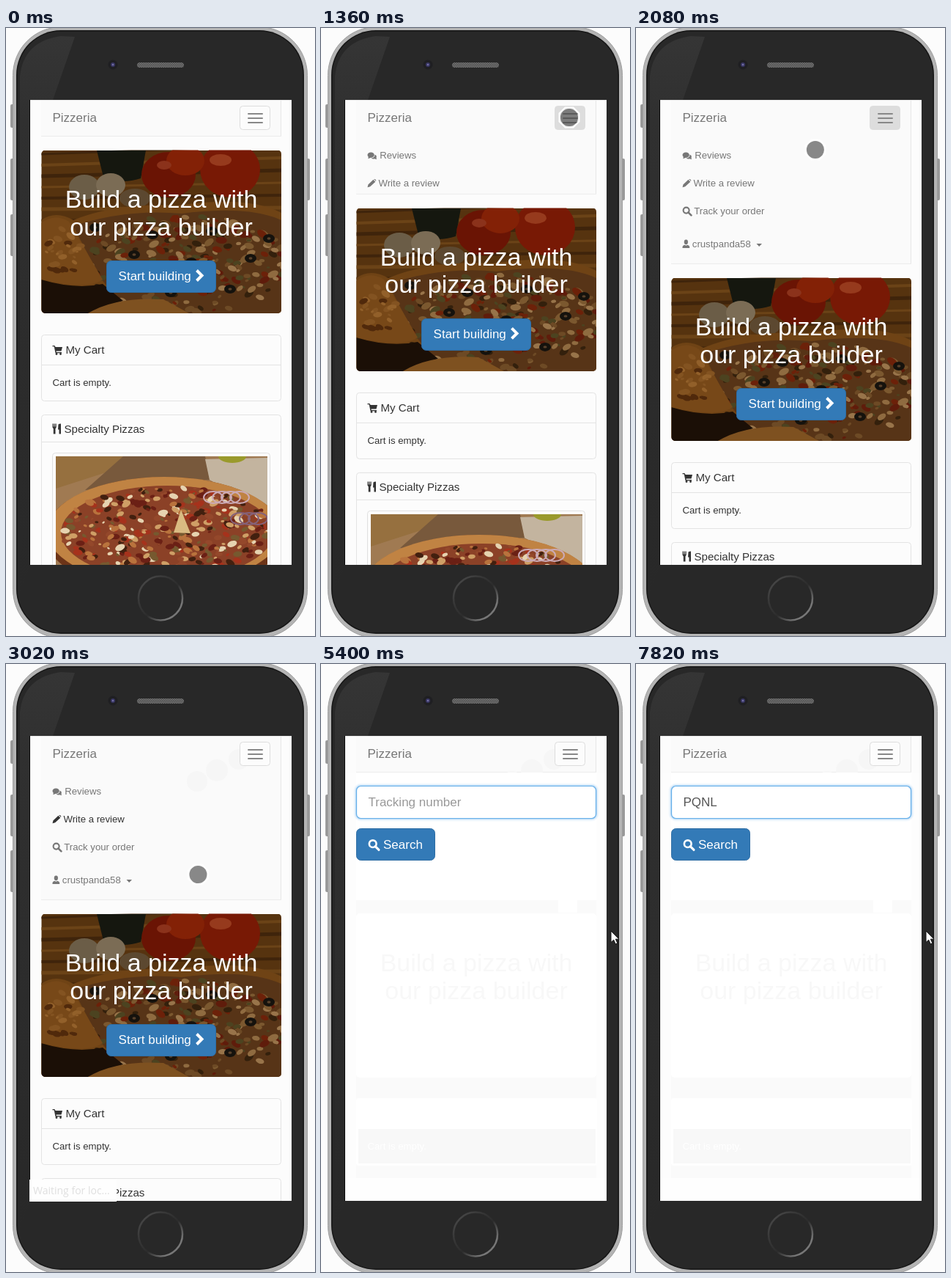
An HTML page that plays this animation: 422 px wide and 829 px high, repeating every 8000 ms.

```html
<!DOCTYPE html>
<html lang="en">
<head>
<meta charset="utf-8">
<title>Pizza order tracking</title>
<style>
html, body { margin: 0; width: 100%; height: 100%; overflow: hidden; background: #fcfcfc; }
svg { display: block; width: 422px; height: 829px; font-family: "Liberation Sans", Arial, sans-serif; }
.status { font-family: "Open Sans", "Noto Sans", sans-serif; }
</style>
</head>
<body>
<svg id="stage" viewBox="0 0 422 829" xmlns="http://www.w3.org/2000/svg"></svg>
<script>
const LOOP = 8000, MENU_H = 174;

// ---------- helpers ----------
let seed = 7;
const rnd = () => (seed = (seed * 16807) % 2147483647) / 2147483647;
const clamp = v => Math.max(0, Math.min(1, v));
const ramp = (t, a, b) => clamp((t - a) / (b - a));
const lerp = (a, b, k) => a + (b - a) * k;
const smooth = k => k * k * (3 - 2 * k);

// CSS "ease" timing curve, cubic-bezier(.25, .1, .25, 1)
function ease(x) {
  let lo = 0, hi = 1, u = x;
  for (let i = 0; i < 20; i++) {
    u = (lo + hi) / 2;
    const px = .75 * u * (1 - u) * (1 - u) + .75 * u * u * (1 - u) + u ** 3;
    if (px < x) lo = u; else hi = u;
  }
  return .3 * u * (1 - u) * (1 - u) + 3 * u * u * (1 - u) + u ** 3;
}

const rect = (x, y, w, h, fill, r = 0, extra = '') =>
  `<rect x="${x}" y="${y}" width="${w}" height="${h}" rx="${r}" fill="${fill}" ${extra}/>`;
const oval = (x, y, rx, ry, fill, extra = '') =>
  `<ellipse cx="${x}" cy="${y}" rx="${rx}" ry="${ry}" fill="${fill}" ${extra}/>`;
const path = (d, fill, extra = '') => `<path d="${d}" fill="${fill}" ${extra}/>`;
const text = (x, y, size, fill, str, extra = '') =>
  `<text x="${x}" y="${y}" font-size="${size}" fill="${fill}" ${extra}>${str}</text>`;
const at = (x, y, s, body) => `<g transform="translate(${x} ${y}) scale(${s})">${body}</g>`;

// Random bits of topping inside an ellipse
function scatter(n, cx, cy, rx, ry, size, colors) {
  let out = '';
  for (let i = 0; i < n; i++) {
    const a = rnd() * 6.283, d = Math.sqrt(rnd()), s = size * (.4 + rnd());
    const x = (cx + rx * d * Math.cos(a)).toFixed(1), y = (cy + ry * d * Math.sin(a)).toFixed(1);
    out += oval(x, y, s.toFixed(1), (s * .6).toFixed(1), colors[i % colors.length],
      `transform="rotate(${(rnd() * 80 - 40).toFixed(0)} ${x} ${y})"`);
  }
  return out;
}

// ---------- icons, drawn in a 14 unit box ----------
const stroke = (c, w) => `stroke="${c}" stroke-width="${w}"`;
const icon = {
  cart: c => path('M0 1H3L4 3H13.5L12 8.5H5L5.3 10H12.5V11.3H4L2.2 2.3H0Z', c) + oval(5.5, 12.5, 1.4, 1.4, c) + oval(11, 12.5, 1.4, 1.4, c),
  cutlery: c => path('M0 0H1.2V4H2V0H3.2V4H4V0H5.2V5L4 7V14H1.3V7L0 5ZM8 1Q9 0 11.5 0V14H9V8H7.5Z', c),
  talk: c => oval(5, 5.5, 5, 4, c) + path('M1.5 7L1 11L6 9Z', c) + path('M10.8 5Q14 6 13 9.2L13.2 12L10.5 11Q7 11.7 5.5 10.2Q11 9.5 10.8 5Z', c),
  pencil: c => path('M0 13L1 9L8.8 1.5L12 4.6L4 12ZM9.7 .8Q10.7 0 11.7 .9L12.7 1.9Q13.5 2.8 12.7 3.7Z', c),
  search: c => oval(5.5, 5.5, 4.3, 4.3, 'none', stroke(c, 2.3)) + path('M8.5 8.5L12.8 12.8', 'none', stroke(c, 2.8) + ' stroke-linecap="round"'),
  user: c => oval(5.5, 3.8, 3, 3.8, c) + path('M0 13V11Q0 9.5 3.5 8.3L5.5 9.5L7.5 8.3Q11 9.5 11 11V13Z', c),
};

// ---------- pictures ----------
function banner() {
  let s = rect(48, 167, 328, 222, '#56330f');
  for (let i = 0; i < 7; i++) s += path(`M48 ${172 + i * 15}L376 ${160 + i * 17}`, 'none', stroke(i % 2 ? '#6b4317' : '#3f240b', 3 + i % 3));
  s += path('M124 167H191L184 205Q156 214 133 203Z', '#15170f');
  s += oval(222, 200, 37, 31, '#6a1404') + oval(306, 193, 41, 38, '#781905') + oval(245, 181, 26, 20, '#832106');
  s += oval(293, 180, 15, 8, '#963a1d') + oval(216, 187, 10, 6, '#8b321b');
  s += oval(107, 217, 21, 17, '#6b5d47') + oval(143, 214, 20, 16, '#7b6c55') + oval(176, 232, 21, 13, '#5c4830');
  s += path('M48 262Q68 248 92 262Q150 238 235 242Q330 228 376 252V389H48Z', '#6f4315');
  s += path('M92 270Q165 246 240 253Q330 241 376 262V389H170L128 340Z', '#573417');
  s += scatter(260, 250, 322, 145, 66, 5.5, ['#7b582f', '#5f1c0b', '#8f6b40', '#33200c', '#6c2109', '#4c4320', '#98744a', '#6d4a25']);
  for (let i = 0; i < 12; i++) {
    const x = 122 + i * 53 % 240, y = 272 + i * 37 % 106;
    s += oval(x, y, 8, 6, '#15120d') + oval(x, y, 2.5, 1.7, '#58402a');
  }
  s += path('M48 266Q66 252 86 264L132 343Q112 358 48 343Z', '#774818');
  s += scatter(30, 78, 305, 26, 34, 5, ['#92602a', '#50290b', '#835321']);
  s += path('M48 343Q95 357 132 349L160 372Q130 380 112 389H48Z', '#1b0f06');
  s += path('M112 389Q150 366 215 370L250 389Z', '#7e5120');
  return `<g clip-path="url(#bannerClip)">${s}</g>`;
}

function special() {
  let s = rect(68, 584, 289, 190, '#a07a52');
  s += path('M68 584H205L68 628Z', '#96703f') + path('M160 584H272L278 616L108 630Z', '#78593c');
  s += path('M272 588L357 586V660L278 616Z', '#c3b49f') + oval(309, 584, 19, 9, '#9a9a2c');
  s += oval(216, 691, 163, 79, '#6c3418') + oval(216, 686, 160, 74, '#c08343') + oval(220, 688, 145, 64, '#8b4127');
  s += scatter(380, 220, 686, 142, 61, 5, ['#a6321c', '#cf9f66', '#6b2015', '#e6d3b0', '#76592f', '#b9733d', '#42200f', '#94482b']);
  for (let i = 0; i < 7; i++)
    s += oval(283 + i * 37 % 62, 640 + i * 29 % 58, 13, 8, 'none', stroke(i % 2 ? '#85627a' : '#cbaab6', 2));
  s += path('M229 688L239 657L252 689Z', '#d9bb82');
  return `<g clip-path="url(#photoClip)">${s}</g>`;
}

// ---------- parts of the page ----------
const mid = 'text-anchor="middle"';
const panel = (y, h) => rect(48.5, y + .5, 327, h, '#fcfcfc', 4, stroke('#e3e3e3', 1));
const divider = y => rect(49, y, 326, 1, '#e3e3e3');

const phone = () => `
  ${rect(6, 104, 5, 32, '#999', 2)}${rect(6, 178, 5, 57, '#999', 2)}${rect(6, 254, 5, 57, '#999', 2)}${rect(410, 178, 5, 57, '#999', 2)}
  ${rect(9.5, -1.5, 402, 833, '#b4b4b4', 66, stroke('#9d9d9d', 1))}
  ${rect(14, 3, 393, 823, '#161616', 61)}
  ${rect(15.5, 4.5, 390, 820, '#282828', 59.5)}
  ${path('M94 12L64 98H33V732L19 770V66Q24 18 75 11Z', 'url(#gloss)')}
  ${rect(32, 98, 1, 634, '#0c0c0c')}
  ${oval(146, 50, 6.5, 6.5, '#1f1f22')}${oval(146, 50, 3, 3, '#3a3865')}${oval(146, 50, 1.2, 1.2, '#7874a8')}
  ${rect(179, 47, 64, 7, 'url(#mesh)', 3.5)}
  ${oval(211, 777.5, 30, 30, 'none', stroke('url(#ring)', 2.5))}`;

const nav = () => `
  <rect id="navBg" x="48" y="98" width="328" fill="#fafafa"/>
  <rect id="navSide" x="375" y="98" width="1" fill="#e7e7e7"/>
  <rect id="navEnd" x="48" width="328" height="1" fill="#ececec"/>
  <g id="trail" fill="#f6f6f6"><circle cx="318" cy="130" r="14"/><circle cx="288" cy="145" r="15"/><circle cx="261" cy="160" r="14"/></g>
  ${rect(33, 98, 357, 1, '#e9e9e9')}
  ${text(63.5, 128, 17, '#777', 'Pizzeria')}
  <rect id="toggle" x="319.5" y="106.5" width="41" height="32" rx="4" stroke="#ddd"/>
  ${[116, 122, 128].map(y => rect(330, y, 21, 2, '#888', 1)).join('')}`;

const menu = () => `<g clip-path="url(#menuClip)">
  ${at(63.5, 168, .93, icon.talk('#777'))}${text(80.2, 178, 13.2, '#777', 'Reviews')}
  <g id="write"></g>
  ${at(63.5, 243.5, .93, icon.search('#777'))}${text(79.2, 254, 13.2, '#777', 'Track your order')}
  ${at(63.5, 288.5, .88, icon.user('#777'))}${text(76.8, 299, 13.2, '#777', 'crustpanda58')}
  ${path('M164.5 294H172L168.2 298Z', '#777')}</g>`;

const home = () => `<g id="content">
  ${banner()}
  ${text(212, 245, 34, '#fff', 'Build a pizza with', mid)}
  ${text(212, 282.5, 34, '#fff', 'our pizza builder', mid)}
  ${rect(137.5, 317.5, 149, 43, '#337ab7', 6, stroke('#2e6da4', 1))}
  ${text(153.6, 344, 17, '#fff', 'Start building')}
  ${path('M260.5 330.5L267.5 337.5L260.5 344.5', 'none', stroke('#fff', 4))}
  ${panel(418, 90)}${divider(459)}
  ${at(63.5, 432, 1, icon.cart('#333'))}${text(81.5, 444, 15.1, '#333', 'My Cart')}
  ${text(63.5, 488, 13.2, '#333', 'Cart is empty.')}
  ${panel(527, 400)}${divider(564)}
  ${at(63.5, 539.5, 1, icon.cutlery('#333'))}${text(79.5, 552, 15.1, '#333', 'Specialty Pizzas')}
  ${rect(63.5, 579.5, 297, 220, '#fcfcfc', 4, stroke('#e0e0e0', 1))}
  ${special()}</g>`;

const track = () => `<g id="track">
  ${rect(33, 148, 357, 584, '#fdfdfd')}
  ${rect(48, 148, 328, 174, '#fff')}
  ${rect(48, 322, 328, 410, '#fafafa')}
  <rect id="smudge" x="324" y="322" width="26" height="17" fill="#fff"/>
  ${rect(48, 340, 328, 224, '#fff', 5)}
  ${text(212, 419, 34, '#f8f8f8', 'Build a pizza with', mid)}
  ${text(212, 456.5, 34, '#f8f8f8', 'our pizza builder', mid)}
  ${rect(48, 592, 329, 92, '#fff', 4)}${rect(51, 634, 324, 47, '#f8f8f8')}
  ${text(63.5, 662, 13.2, '#fff', 'Cart is empty.')}
  ${rect(33, 701, 357, 31, '#fefefe')}
  <g id="glow" fill="none" stroke="#66afe9">${[[8, .07], [5, .15], [3, .25]].map(([w, o]) =>
    `<rect x="48.5" y="166.5" width="327" height="44" rx="6" stroke-width="${w}" opacity="${o}"/>`).join('')}</g>
  <rect id="field" x="48.5" y="166.5" width="327" height="44" rx="6" fill="#fff" stroke-width="1.2"/>
  <text id="value" x="64.5" y="194" font-size="17"></text>
  <rect id="caret" y="178" width="1.2" height="20" fill="#444"/>
  ${rect(48.5, 224.5, 107, 43, '#337ab7', 6, stroke('#2e6da4', 1))}
  ${at(64.5, 239, 1.13, icon.search('#fff'))}${text(85, 252, 17, '#fff', 'Search')}</g>`;

const stage = document.getElementById('stage');
stage.innerHTML = `<defs>
  <clipPath id="screenClip"><rect x="33" y="98" width="357" height="634"/></clipPath>
  <clipPath id="bannerClip"><rect x="48.5" y="166.5" width="327.5" height="222.5" rx="5"/></clipPath>
  <clipPath id="photoClip"><rect x="68" y="584" width="289" height="190"/></clipPath>
  <clipPath id="menuClip"><rect id="menuBox" x="48" y="148" width="328"/></clipPath>
  <linearGradient id="gloss" x2="0" y2="1"><stop stop-color="#353535"/><stop offset=".15" stop-color="#303030"/><stop offset="1" stop-color="#282828"/></linearGradient>
  <linearGradient id="ring" x2="1" y2="1"><stop stop-color="#505050"/><stop offset=".3" stop-color="#383838"/><stop offset=".55" stop-color="#2c2c2c"/><stop offset=".8" stop-color="#777"/></linearGradient>
  <pattern id="mesh" width="3" height="3" patternUnits="userSpaceOnUse"><rect width="3" height="3" fill="#4a4a4a"/><path d="M0 0H1.5V1.5H3V3H1.5V1.5H0Z" fill="#777"/></pattern>
</defs>
${phone()}
<g clip-path="url(#screenClip)">${rect(33, 98, 357, 634, '#fcfcfc')}${nav()}<g id="home">${menu()}${home()}</g>${track()}</g>
<g id="status">${rect(32, 703, 119, 30, '#fefefe')}<text id="statusText" class="status" x="37" y="723" font-size="14" fill="#777">Waiting for loc...</text></g>
<g id="touch">
  <path d="M-5.5 -13.5H5.5L13.5 -5.5V5.5L5.5 13.5H-5.5L-13.5 5.5V-5.5Z" fill="none" stroke="#fff" stroke-width="2"/>
  <circle r="12" fill="#3c3c3c" fill-opacity=".6"/></g>
<path id="arrow" d="M0 0V15.5L3.7 12.2L6.2 17.8L8.9 16.6L6.4 11.2H11Z" fill="#fff" stroke="#111"/>`;

const el = {};
stage.querySelectorAll('[id]').forEach(n => el[n.id] = n);
const set = (id, attrs) => { for (const k in attrs) el[id].setAttribute(k, attrs[k]); };
const show = (id, on) => el[id].setAttribute('visibility', on ? 'visible' : 'hidden');

// ---------- timeline ----------
// Pointer moves: start, end, from x, y, to x, y
const moves = [
  [640, 1200, 424, 152, 339, 122],
  [1710, 2490, 339, 122, 136, 217],
  [2870, 3160, 136, 217, 374, 349],
  [3340, 3900, 374, 349, 143, 199],
  [4140, 4390, 143, 199, 396, 364],
];
// Typing: time, text, caret x
const keys = [[3890, '', 64], [5900, 'P', 75.8], [6260, 'PQ', 89], [7000, 'PQN', 101.2], [7320, 'PQNL', 110.4]];

function pointer(t) {
  let p = [moves[0][2], moves[0][3]];
  for (const [a, b, x0, y0, x1, y1] of moves) {
    if (t < a) break;
    const k = smooth(ramp(t, a, b));
    p = [lerp(x0, x1, k), lerp(y0, y1, k)];
  }
  return p;
}

function draw(t) {
  const open = MENU_H * ease(ramp(t, 1276, 1590));
  const tracking = t >= 3370;
  const bottom = 147 + (tracking ? 0 : open);

  set('navBg', { height: bottom - 98 });
  set('navSide', { height: bottom - 98 });
  set('navEnd', { y: bottom });
  show('navEnd', tracking || open > 0);
  show('trail', t >= 2300);
  set('toggle', { fill: t >= 1230 && t < 2620 ? '#ddd' : '#fcfcfc' });

  show('home', !tracking);
  show('track', tracking);
  set('menuBox', { height: open });
  set('content', { transform: `translate(0 ${open.toFixed(2)})` });
  const ink = t >= 2620 ? '#333' : '#777';
  if (el.write.dataset.ink !== ink) {
    el.write.dataset.ink = ink;
    el.write.innerHTML = at(63.5, 205.5, .9, icon.pencil(ink)) + text(78.5, 216, 13.2, ink, 'Write a review');
  }

  show('status', t >= 2980 && !tracking);
  set('statusText', { opacity: ramp(t, 2980, 3160) });

  const focus = ramp(t, 3940, 4140);
  const blue = [lerp(204, 102, focus), lerp(204, 175, focus), lerp(210, 233, focus)].map(Math.round);
  set('field', { stroke: `rgb(${blue})` });
  set('glow', { opacity: focus });
  show('smudge', tracking && t >= 4300);

  const key = keys.filter(k => t >= k[0]).pop();
  const typed = key ? key[1] : '';
  el.value.textContent = typed || 'Tracking number';
  set('value', { fill: typed ? '#555' : '#999' });
  show('caret', tracking && key && (t - key[0]) % 1004 < 500);
  if (key) set('caret', { x: key[2] });

  const [x, y] = pointer(t), place = `translate(${x.toFixed(1)} ${y.toFixed(1)})`;
  const inside = x < 388;
  set('touch', { transform: place });
  set('arrow', { transform: place });
  show('touch', t >= 670 && inside);
  show('arrow', t >= 670 && !inside);
}

const start = performance.now();
function tick() {
  draw((performance.now() - start) % LOOP);
  requestAnimationFrame(tick);
}
tick();
</script>
</body>
</html>
```
